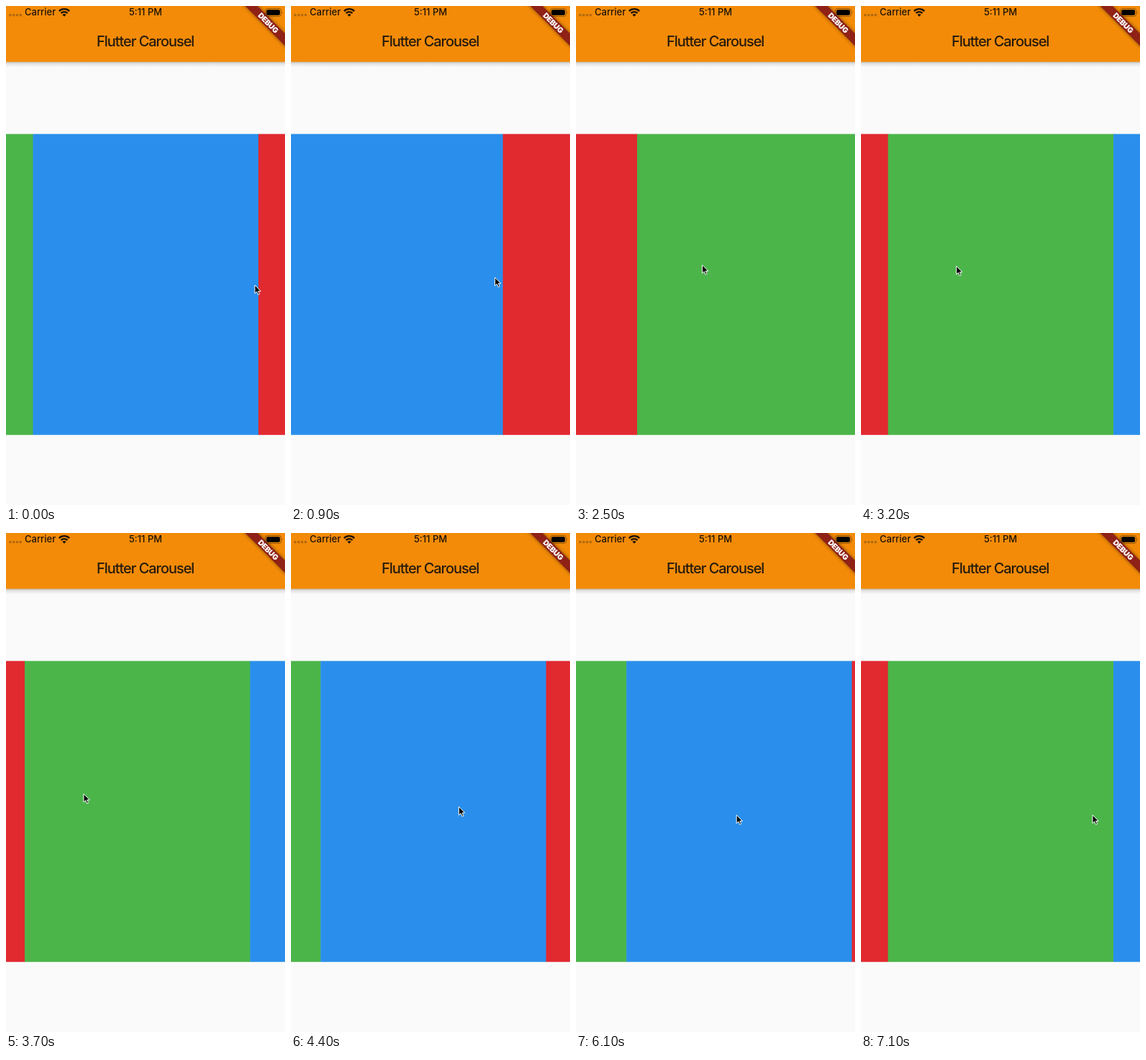
These frames come from a looping animation (388x692 px, 7.7 s). An HTML page:

```html
<!DOCTYPE html>
<html lang="en">
<head>
<meta charset="utf-8">
<title>Flutter Carousel</title>
<style>
  html, body { margin: 0; width: 100%; height: 100%; overflow: hidden; background: #fafafa; }
  svg { display: block; width: 100%; height: 100%; }
  text { font-family: Inter, Roboto, sans-serif; }
</style>
</head>
<body>
<svg viewBox="0 0 388 692">
  <defs>
    <linearGradient id="shade" x1="0" y1="0" x2="0" y2="1">
      <stop offset="0" stop-color="#000" stop-opacity=".25"/>
      <stop offset=".4" stop-color="#000" stop-opacity=".09"/>
      <stop offset="1" stop-color="#000" stop-opacity="0"/>
    </linearGradient>
  </defs>
  <rect width="388" height="692" fill="#fafafa"/>
  <g id="pages"></g>

  <rect y="77" width="388" height="8" fill="url(#shade)"/>
  <rect width="388" height="77.5" fill="#f38b08"/>
  <text x="193.7" y="55.8" font-size="20" font-weight="500" letter-spacing="-1.05" text-anchor="middle" fill="#271b0d">Flutter Carousel</text>

  <g transform="translate(388 0) rotate(45)">
    <rect x="-50" y="27" width="100" height="12" fill="#000" opacity=".5" style="filter:blur(2.5px)"/>
    <rect x="-50" y="27" width="100" height="12" fill="#8f2117"/>
    <text y="36.8" font-size="10.4" font-weight="900" letter-spacing="-.3" text-anchor="middle" fill="#fff">DEBUG</text>
  </g>

  <g fill="#1c1206">
    <g id="dots" fill="#b0690f"></g>
    <text x="26" y="13.4" font-size="13" font-weight="500">Carrier</text>
    <text x="194" y="13.4" font-size="13" font-weight="500" text-anchor="middle">5:11 PM</text>
    <g fill="none" stroke="#1c1206" stroke-width="2.2">
      <path d="M73.8 7.1a10.2 10.2 0 0 1 14.4 0"/>
      <path d="M76.5 9.9a6.4 6.4 0 0 1 9 0"/>
    </g>
    <path d="M81 14.8l-2.6-2.7a3.8 3.8 0 0 1 5.2 0z"/>
    <rect x="360.6" y="3.6" width="22" height="10.8" rx="3" fill="none" stroke="#1c1206" stroke-opacity=".45"/>
    <rect x="362.2" y="5.2" width="18.8" height="7.6" rx="1.8" fill="#000"/>
    <path d="M383.8 7.2q1.6 1.8 0 3.6z" opacity=".5"/>
  </g>

  <path id="cursor" d="M0 0V11.6L2.7 9.1 4.6 13.4 6.6 12.5 4.7 8.4H8.3Z" fill="#000" stroke="#fff" stroke-width="1" stroke-linejoin="round"/>
</svg>
<script>
const NS = 'http://www.w3.org/2000/svg';
const LOOP = 7700, STEP = 100, STILL = 0.3, DONE = 7.1;
const PAGE = 313.5, LEFT = 37.5;
const COLORS = ['#2a8fec', '#e12930', '#4bb54a'];
const START = { x: 346, y: 387 }, END = { x: 322, y: 391 };

// Drag: start and length (s), page it lands on, distance, easing power, pointer path
const SWIPES = [
  { at: 0.65, len: 0.307, to: 1, dist: 85, pow: 2, x: 340, y: 387, y2: 374 },
  { at: 1.87, len: 0.412, to: 2, dist: 88, pow: 2, x: 268, y: 376, y2: 359 },
  { at: 3.595, len: 0.32, to: 3, dist: 107, pow: 2, x: 119.5, y: 361, y2: 363 },
  { at: 4.71, len: 0.3, to: 4, dist: 86, pow: 2, x: 346, y: 388, y2: 387 },
  { at: 5.38, len: 0.24, to: 3, dist: -90, pow: 2, x: 238, y: 388, y2: 390 },
  { at: 5.93, len: 0.51, to: 2, dist: -152, pow: 1, x: 172.5, y: 391, y2: 391 }
];

function add(parent, tag, attrs) {
  const el = document.createElementNS(NS, tag);
  for (const k in attrs) el.setAttribute(k, attrs[k]);
  return document.getElementById(parent).appendChild(el);
}

const pages = [0, 1, 2].map(() => add('pages', 'rect', { y: 177.5, width: PAGE + 0.5, height: 417.3 }));
for (let i = 0; i < 4; i++) add('dots', 'circle', { cx: 5.8 + i * 4.8, cy: 12.6, r: 1.8 });
const cursor = document.getElementById('cursor');

const clamp = v => Math.min(1, Math.max(0, v));
const mix = (a, b, u) => a + (b - a) * u;
const smooth = u => u * u * (3 - 2 * u);

// Overdamped page-snapping spring: gap left after t seconds
function spring(gap, speed, t) {
  const slow = 9.07, fast = 22.03;
  const b = (speed - slow * gap) / (fast - slow);
  return (gap - b) * Math.exp(-slow * t) + b * Math.exp(-fast * t);
}

function swipePos(s, from, t) {
  const u = (t - s.at) / s.len;
  if (u <= 1) return from + s.dist * Math.pow(clamp(u), s.pow);
  const goal = s.to * PAGE;
  return goal - spring(goal - from - s.dist, s.pow * s.dist / s.len, t - s.at - s.len);
}

function scrollAt(t) {
  if (t >= DONE) return SWIPES[SWIPES.length - 1].to * PAGE;
  let pos = 0;
  SWIPES.forEach((s, i) => {
    const next = SWIPES[i + 1];
    if (t > s.at) pos = swipePos(s, pos, next ? Math.min(t, next.at) : t);
  });
  return pos;
}

function pointerAt(t) {
  let last = START, since = STILL;
  for (const s of SWIPES) {
    if (t < s.at) return glide(last, s, since, s.at, t);
    const u = (t - s.at) / s.len;
    if (u < 1) return { x: s.x - s.dist * Math.pow(u, s.pow), y: mix(s.y, s.y2, u) };
    last = { x: s.x - s.dist, y: s.y2 };
    since = s.at + s.len;
  }
  return glide(last, END, since, DONE, t);
}

function glide(a, b, t0, t1, t) {
  const u = smooth(clamp((t - t0) / (t1 - t0)));
  return { x: mix(a.x, b.x, u), y: mix(a.y, b.y, u) };
}

function draw(ms) {
  const t = Math.floor((ms % LOOP) / STEP) * STEP / 1000;
  const pos = scrollAt(t), mid = Math.round(pos / PAGE);
  pages.forEach((el, i) => {
    const n = mid + i - 1;
    el.setAttribute('x', (LEFT + n * PAGE - pos).toFixed(2));
    el.setAttribute('fill', COLORS[(n + 3) % 3]);
  });
  const p = pointerAt(t);
  cursor.setAttribute('transform', `translate(${p.x.toFixed(1)} ${p.y.toFixed(1)})`);
}

const began = performance.now();
function tick() {
  draw(performance.now() - began);
  requestAnimationFrame(tick);
}
tick();
</script>
</body>
</html>
```
